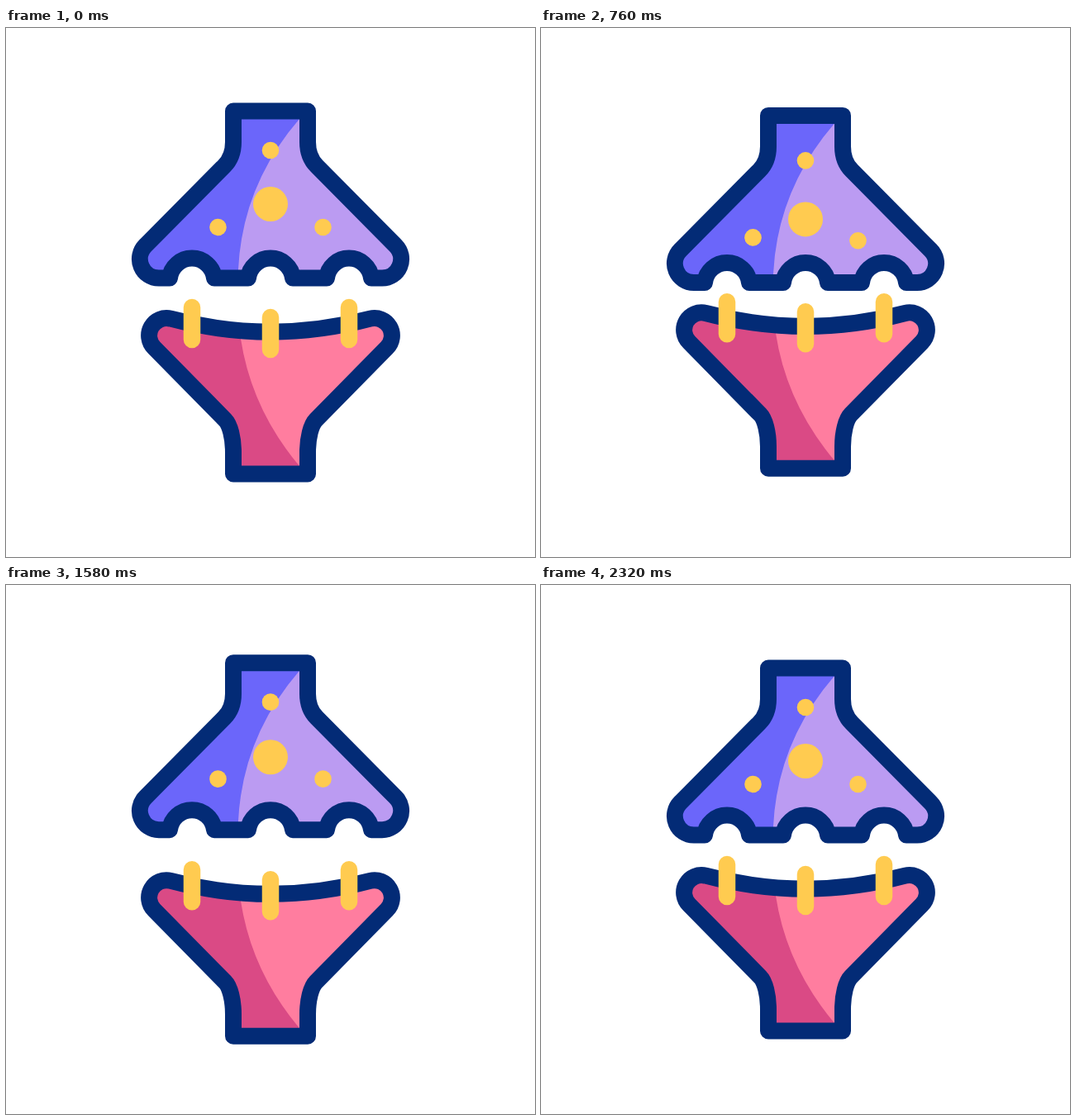
An HTML page that plays this animation: 640 by 640 pixels, repeating every 2.6 s.

```html
<!DOCTYPE html>
<html lang="en">
<head>
<meta charset="utf-8">
<title>Two halves</title>
<style>
  html, body { margin: 0; width: 100%; height: 100%; overflow: hidden; background: #fff; }
  svg { display: block; width: 100vw; height: 100vh; }
  .outline { fill: none; stroke: #032b76; stroke-width: 20; stroke-linejoin: round; }
  .pins { fill: none; stroke: #ffcb50; stroke-width: 20.5; stroke-linecap: round; }
  .dots { fill: #ffcb50; }
</style>
</head>
<body>
<svg viewBox="0 0 640 640">
  <defs>
    <path id="upperShape" d="M275 100.5H365V138C365 150 368 159 376 167L471.3 263.2
      A23 23 0 0 1 455 302.5H442A27.2 27.2 0 0 0 388 302.5H347A27.2 27.2 0 0 0 293 302.5
      H252A27.2 27.2 0 0 0 198 302.5H185A23 23 0 0 1 168.7 263.2L264 167C272 159 275 150 275 138Z"/>
    <path id="lowerShape" d="M199.4 351.7Q320 383.6 440.6 351.7A21 21 0 0 1 460.8 386.8L375 474
      C369 480 365 496 365 513V539.5H275V513C275 496 271 480 265 474L179.2 386.8A21 21 0 0 1 199.4 351.7Z"/>
    <clipPath id="upperClip"><use href="#upperShape"/></clipPath>
    <clipPath id="lowerClip"><use href="#lowerShape"/></clipPath>
  </defs>
  <g id="upper">
    <use href="#upperShape" fill="#bb9bf2"/>
    <path clip-path="url(#upperClip)" fill="#6b66fa" d="M355 110Q286 190 281 292V310H140V90H355Z"/>
    <use href="#upperShape" class="outline"/>
    <g id="dots" class="dots"></g>
  </g>
  <g id="lower">
    <use href="#lowerShape" fill="#ff7d9f"/>
    <path clip-path="url(#lowerClip)" fill="#da4a85" d="M284 376Q297 461 355 530V545H150V340H280Z"/>
    <use href="#lowerShape" class="outline"/>
    <path class="pins" d="M225 338V377M320 350V389M415 338V377"/>
  </g>
</svg>
<script>
const LOOP = 2600;
const BOUNCE = { height: 13, period: 600, count: 2 };

// time, upper offset, lower offset
const poses = [
  [200, 0, 0], [440, -16, 17], [560, -6.8, 6.9], [750, 5, -6.2],
  [1060, 14, -16.5], [1300, 8.5, -10.6], [1580, -6.3, 6.1], [1697, -16, 17],
  [1820, -5, 4.5], [1960, 6.4, -8.8], [2040, 9, -11], [2320, 0, 0]
];

const upper = document.getElementById('upper');
const lower = document.getElementById('lower');
const dotLayer = document.getElementById('dots');

const dots = [
  { x: 320, y: 148, r: 10.3, start: 318 },
  { x: 256.5, y: 241, r: 10.3, start: 318 },
  { x: 383.5, y: 241, r: 10.3, start: 380 },
  { x: 320, y: 213, r: 21, start: 450 }
];
for (const dot of dots) {
  dot.node = document.createElementNS('http://www.w3.org/2000/svg', 'circle');
  dot.node.setAttribute('cx', dot.x);
  dot.node.setAttribute('r', dot.r);
  dotLayer.append(dot.node);
}

function slope(i, part) {
  if (i === 0 || i === poses.length - 1) return 0;
  const rate = j => (poses[j + 1][part] - poses[j][part]) / (poses[j + 1][0] - poses[j][0]);
  const before = rate(i - 1), after = rate(i);
  return before * after <= 0 ? 0 : 2 * before * after / (before + after);
}

// Monotone cubic interpolation: extremes stay at the listed poses
function offset(time, part) {
  const next = poses.findIndex(pose => pose[0] > time);
  if (next < 1) return 0;
  const a = poses[next - 1], b = poses[next];
  const span = b[0] - a[0], u = (time - a[0]) / span, v = 1 - u;
  return a[part] * v * v * (1 + 2 * u) + b[part] * u * u * (1 + 2 * v)
    + span * u * v * (slope(next - 1, part) * v - slope(next, part) * u);
}

function bounce(time) {
  const cycles = time / BOUNCE.period;
  if (cycles < 0 || cycles > BOUNCE.count) return 0;
  return BOUNCE.height * Math.sin(Math.PI * cycles) ** 2;
}

function draw(time) {
  upper.setAttribute('transform', `translate(0 ${offset(time, 1)})`);
  lower.setAttribute('transform', `translate(0 ${offset(time, 2)})`);
  for (const dot of dots) dot.node.setAttribute('cy', dot.y + bounce(time - dot.start));
}

const begin = performance.now();
function tick() {
  draw((performance.now() - begin) % LOOP);
  requestAnimationFrame(tick);
}
tick();
</script>
</body>
</html>
```
